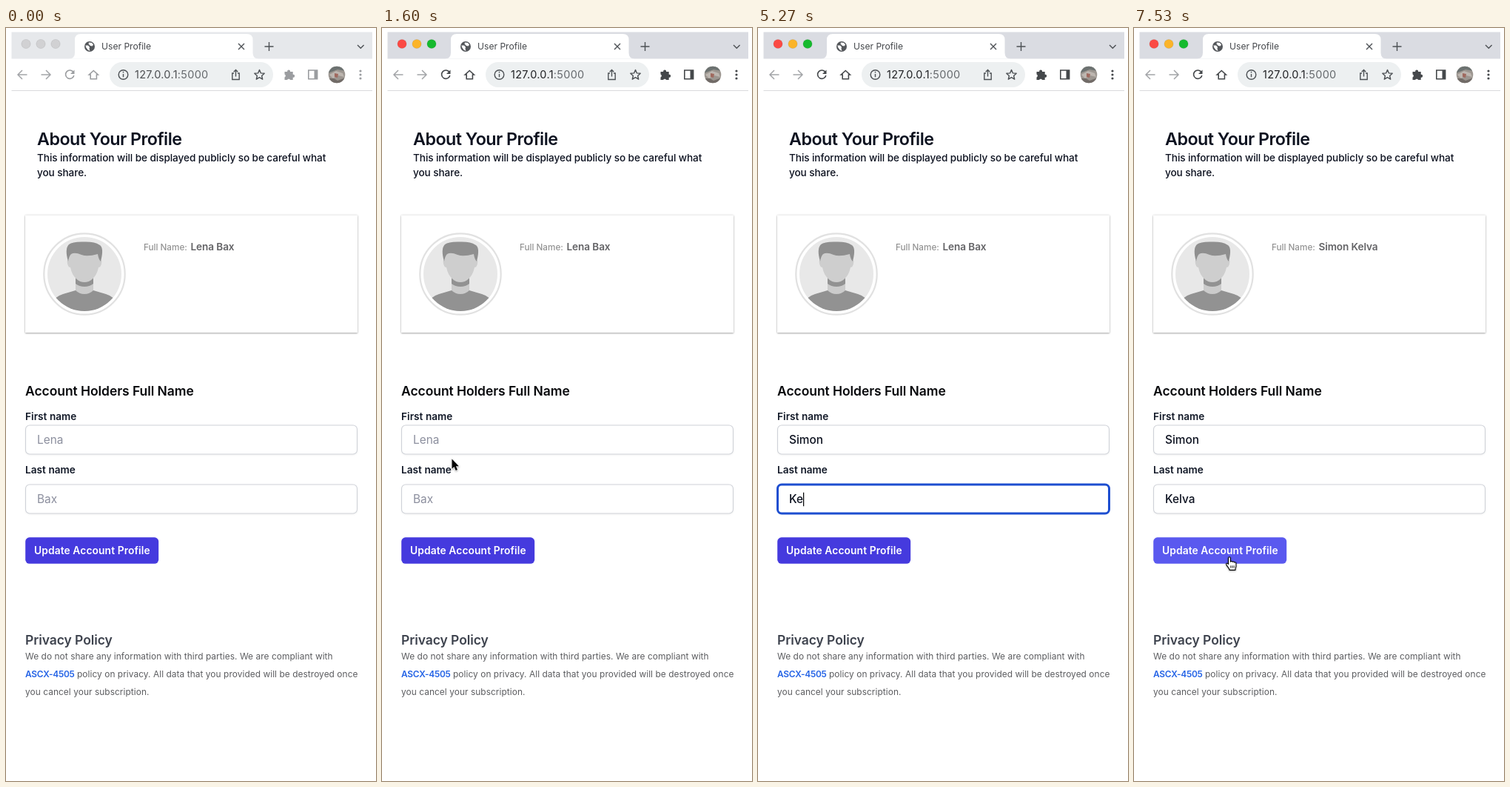
Write an HTML page that moves like this. It is 500 px wide and 1016 px high and loops after 8000 ms.

```html
<!DOCTYPE html>
<html lang="en">
<head>
<meta charset="utf-8">
<title>User Profile</title>
<style>
html, body { margin: 0; width: 100%; height: 100%; overflow: hidden; background: #fff; }
svg { display: block; width: 500px; height: 1016px; --strip: #dadce2; --icon: #45484b; --ink: #202124; }
svg.idle { --strip: #e6e8eb; --icon: #9b9da0; --ink: #4d4f52; }
text { font-family: Inter, "Open Sans", sans-serif; font-optical-sizing: none; white-space: pre; }
.line { fill: none; stroke: var(--icon); stroke-width: 1.6; }
.solid { fill: var(--icon); }
.fixed { fill: none; stroke: #4d5155; stroke-width: 1.4; }
.light { stroke: #0002; stroke-width: .6; }
.idle .light { fill: #d1d1d3; }
.title { font-size: 23.3px; font-weight: 600; letter-spacing: -.53px; fill: #0d1220; }
.head { font-size: 17.5px; font-weight: 600; letter-spacing: -.07px; }
.intro { font-size: 13.6px; font-weight: 500; letter-spacing: -.08px; fill: #0d1220; }
.label { font-size: 13.6px; font-weight: 600; letter-spacing: .04px; fill: #111827; }
.value { font-size: 15.4px; font-weight: 500; fill: #0d1220; }
.value.hint { font-weight: 400; fill: #8c8f9e; }
.small { font-size: 11.9px; letter-spacing: .06px; fill: #5c5d60; }
.link { font-weight: 600; letter-spacing: -.25px; fill: #2463e6; }
.box { fill: #fff; stroke: #cfd2d8; stroke-width: 1.1; filter: drop-shadow(0 1px 1px #0000000d); }
.box.focus { stroke: #1d4ed0; stroke-width: 3; filter: none; }
.button { fill: #453ade; }
.button.hover { fill: #5a59ef; }
.card { fill: #fff; filter: drop-shadow(0 1px 1px #0000004d) drop-shadow(0 0 1px #00000024); }
#pointer { filter: drop-shadow(0 1px 1px #0005); }
</style>
</head>
<body>
<svg id="stage" viewBox="0 0 500 1016">
  <defs>
    <clipPath id="disc"><circle cx="106" cy="332" r="50"/></clipPath>
    <clipPath id="badge"><circle cx="447" cy="63" r="11.3"/></clipPath>
  </defs>

  <!-- tab strip -->
  <path d="M7.5 5.5H495V41.5H7.5Z" style="fill:var(--strip)"/>
  <path d="M85 41.5q8 0 8-8V16q0-8 8-8H325.5q8 0 8 8V33.5q0 8 8 8Z" fill="#fff"/>
  <circle class="light" cx="27" cy="21.5" r="6.1" fill="#fb4a44"/>
  <circle class="light" cx="47" cy="21.5" r="6.1" fill="#fbb429"/>
  <circle class="light" cx="67" cy="21.5" r="6.1" fill="#16ba2e"/>
  <circle cx="113" cy="25" r="7" fill="#54575b"/>
  <path d="M107.5 23.5h3.5l2 2.2-.5 2.3 1 3-3-1.5-2.5-3.5ZM112 19.5l4 .5 2 2.5-1.5 2-2.5-.5-2.5-2.5Z" fill="#fff"/>
  <text x="129" y="29.3" font-size="12.1" fill="#45484c">User Profile</text>
  <path d="M314 21l8 8m0-8l-8 8" class="fixed"/>
  <path d="M349.5 25h12m-6-6v12" class="fixed"/>
  <path d="M475 23l4.3 4.3 4.3-4.3" class="fixed"/>

  <!-- toolbar -->
  <path d="M7.5 84.5H495" stroke="#d9dadc"/>
  <g fill="none" stroke="#a3a5a8" stroke-width="1.5">
    <path d="M28.5 63H16m6-6l-6 6 6 6"/>
    <path d="M47.5 63H60m-6-6l6 6-6 6"/>
  </g>
  <path class="line" d="M91 59.5a5.7 5.7 0 1 0 .8 4.5"/>
  <path class="solid" d="M92.5 56.5v5.5H87Z"/>
  <path class="line" d="M118.3 57.5l6 5.5h-1.9v5.8h-8.2V63h-1.9Z"/>
  <rect x="140" y="46" width="221" height="34" rx="17" fill="#edf0f1"/>
  <circle class="fixed" cx="158.5" cy="63" r="6.3"/>
  <path class="fixed" d="M158.5 62v4.2m0-7.4v1.6"/>
  <text x="174" y="68" font-size="14.5" letter-spacing=".3" style="fill:var(--ink)">127.0.0.1<tspan fill="#666a6e">:5000</tspan></text>
  <path class="fixed" d="M308 61h-2.2v8.5h9.4V61H313m-2.5 4.5v-9m-2.8 2.7l2.8-2.8 2.8 2.8"/>
  <path class="fixed" stroke-linejoin="round" d="M342.5 56.5l1.9 4.4 4.8.4-3.6 3.2 1.1 4.7-4.2-2.5-4.2 2.5 1.1-4.7-3.6-3.2 4.8-.4Z"/>
  <path class="solid" d="M376.5 59h3.7a2 2 0 1 1 3.8 0h3.7v3.8a2 2 0 1 1 0 3.9V70h-3.7a2.100 2.100 0 0 0-3.9 0h-3.6v-3.5a2.100 2.100 0 0 0 0-3.9Z"/>
  <path class="line" d="M408.8 57h11.8v11.8h-11.8Z"/>
  <path class="solid" d="M416.5 57h4v12h-4Z"/>
  <g clip-path="url(#badge)">
    <path d="M435 51h24v24h-24Z" fill="#9c9690"/>
    <path d="M435 51h24v7l-11-2-13 5Z" fill="#6c7271"/>
    <path d="M437 63l9-5 9 3 2 5-8-2-7 4Z" fill="#bdb6b0"/>
    <path d="M435 68l8 0 5 3 11-4v9h-24Z" fill="#716b67"/>
    <path d="M444 61l5 1-1 5-4-1Z" fill="#a0695e"/>
  </g>
  <g class="solid"><circle cx="479" cy="58" r="1.6"/><circle cx="479" cy="63" r="1.6"/><circle cx="479" cy="68" r="1.6"/></g>

  <!-- profile -->
  <text class="title" x="42" y="158">About Your Profile</text>
  <text class="intro" x="42" y="180">This information will be displayed publicly so be careful what</text>
  <text class="intro" x="42" y="200">you share.</text>
  <rect class="card" x="26" y="252.5" width="449" height="158.5"/>
  <circle cx="106" cy="332" r="54.7" fill="#fff" stroke="#e1e1e1" stroke-width="2.2"/>
  <g clip-path="url(#disc)">
    <path d="M56 282h100v100H56Z" fill="#e8e8e8"/>
    <path d="M64 371q2-9 13-12l17-5h24l17 5q11 3 13 12v14H64Z" fill="#929292"/>
    <path d="M94 335h24v19q-5 5-12 5t-12-5Z" fill="#cbcbcb"/>
    <path d="M94 335h24v10q-5 4-12 4t-12-4Z" fill="#929292"/>
    <path d="M84 313q-2 0-1 5t4 5q2 10 8 15.500 5 4.500 11 4.500t11-4.500q6-5.500 8-15.500 3 0 4-5t-1-5L126 299H87Z" fill="#cecece"/>
    <path d="M84 315q-5-17 1-23 5-4 20-3.500 15-.5 21 4 7 3 2 22.500-3-3-4-10-14 4-22 1-9-4-14-1-3 3-4 10Z" fill="#8f8f8f"/>
  </g>
  <text x="186" y="299.5" font-size="11.7" font-weight="500" fill="#929292">Full Name:</text>
  <text id="owner" x="249.5" y="300" font-size="13.6" font-weight="600" letter-spacing="-.1" fill="#636366"></text>

  <!-- form -->
  <text class="head" x="26" y="496" fill="#08090c">Account Holders Full Name</text>
  <text class="label" x="26" y="528.5">First name</text>
  <rect class="box" x="26.5" y="536" width="448" height="39" rx="5.5"/>
  <text class="value" x="42" y="561.3"></text>
  <text class="label" x="26" y="600.5">Last name</text>
  <rect class="box" x="26.5" y="616" width="448" height="39" rx="5.5"/>
  <text class="value" x="42" y="641.3"></text>
  <path id="caret" d="M.6-14.500V4" stroke="#000" stroke-width="1.2"/>
  <rect class="button" id="button" x="26.2" y="687.3" width="180" height="35.5" rx="5.5"/>
  <text x="38" y="710.3" font-size="13.8" font-weight="600" letter-spacing=".1" fill="#fff">Update Account Profile</text>

  <!-- policy -->
  <text class="head" x="26" y="831.5" fill="#3e434e">Privacy Policy</text>
  <text class="small" x="26" y="851.5">We do not share any information with third parties. We are compliant with</text>
  <text class="small" x="26" y="875.5"><tspan class="link">ASCX-4505</tspan> policy on privacy. All data that you provided will be destroyed once</text>
  <text class="small" x="26" y="899.5">you cancel your subscription.</text>

  <g id="pointer">
    <path id="arrow" d="M0 0V13.200L3 10.500 5.200 15.500 7.500 14.500 5.400 9.700H9.400Z" stroke="#fff" stroke-width="1.2" paint-order="stroke"/>
    <g id="beam" fill="none">
      <path d="M-3.500-7.500q3.500 0 3.500 2.500V5q0 2.500-3.500 2.500M3.500-7.500Q0-7.500 0-5V5q0 2.500 3.500 2.500M-2 1.500H2" stroke="#fff" stroke-width="2.6"/>
      <path d="M-3.500-7.500q3.500 0 3.500 2.500V5q0 2.500-3.500 2.500M3.500-7.500Q0-7.500 0-5V5q0 2.500 3.500 2.500M-2 1.500H2" stroke="#000" stroke-width="1.2"/>
    </g>
    <g id="hand" transform="translate(2.900 8.600) scale(1.1)" stroke="#000" stroke-linejoin="round">
      <path d="M-4-6.500c0-2 2.600-2 2.600 0v4.300c.6-1 2.200-.8 2.400.3.700-.8 2.100-.5 2.300.6.800-.7 2.200-.2 2.200 1.200V3c0 1.500-1 2.500-1 5H-2.500c0-2-2.800-4-4-6.800-.6-1.500 1-2.300 2.500-.4Z" fill="#fff"/>
      <path d="M-1 2.500v3M1 2.500v3M3 2.500v3" stroke-width=".8"/>
    </g>
  </g>
</svg>
<script>
const LOOP = 8000, TICK = 1000 / 15;
const $ = id => document.getElementById(id);
const stage = $('stage'), caret = $('caret'), pointer = $('pointer');
const boxes = document.querySelectorAll('.box');
const values = document.querySelectorAll('.value');

const fields = [
  { hint: 'Lena', text: 'Simon', keys: [3000, 3270, 3400, 3530, 3730] },
  { hint: 'Bax', text: 'Kelva', keys: [4800, 5270, 5530, 5670, 5870] }
];
const caretOff = [[2530, 3000], [4670, 4800], [6330, 6870]];

// time, x, y, and whether the move towards this point slows down
const path = [
  [0, 300, 985], [600, 215, 782, true], [1200, 215, 782], [1333, 191.5, 737],
  [1800, 73, 547, true], [6533, 75, 551], [6800, 102, 643], [7133, 129, 714, true]
];

const within = (t, [from, to]) => t >= from && t < to;
const show = (el, on) => el.setAttribute('visibility', on ? 'inherit' : 'hidden');

function pointerAt(t) {
  const time = Math.floor((t + 4) / TICK) * TICK + 1;
  const i = path.findIndex(p => p[0] > time);
  if (i < 0) return path[path.length - 1].slice(1, 3);
  const [a, b] = [path[i - 1], path[i]];
  let u = (time - a[0]) / (b[0] - a[0]);
  if (b[3]) u *= 2 - u;
  return [a[1] + (b[1] - a[1]) * u, a[2] + (b[2] - a[2]) * u];
}

function drawPointer(t) {
  const [x, y] = pointerAt(t);
  const inField = x > 26 && x < 475 && (y > 535 && y < 576 || y > 615 && y < 656);
  const onButton = x > 26 && x < 206 && y > 687 && y < 723;
  const visible = within(t, [70, 3000]) || t >= 6600;
  const kind = inField ? 'beam' : onButton ? 'hand' : 'arrow';
  for (const id of ['arrow', 'beam', 'hand']) show($(id), id === kind);
  show(pointer, visible);
  pointer.setAttribute('transform', `translate(${x.toFixed(1)} ${y.toFixed(1)})`);
  $('button').classList.toggle('hover', visible && onButton);
}

function drawForm(t) {
  const focus = within(t, [2000, 4130]) ? 0 : within(t, [4130, 7330]) ? 1 : -1;
  fields.forEach((f, i) => {
    const typed = f.text.slice(0, f.keys.filter(k => t >= k).length);
    values[i].textContent = typed || f.hint;
    values[i].classList.toggle('hint', !typed);
    boxes[i].classList.toggle('focus', i === focus);
    if (i === focus) {
      const x = 42 + (typed ? values[i].getComputedTextLength() : 0);
      caret.setAttribute('transform', `translate(${x} ${561.3 + 80 * i})`);
    }
  });
  show(caret, focus >= 0 && !caretOff.some(span => within(t, span)));
  const part = t < 7470 ? 'hint' : 'text';
  $('owner').textContent = fields.map(f => f[part]).join(' ');
}

function draw(t) {
  stage.classList.toggle('idle', t < 670);
  drawForm(t);
  drawPointer(t);
}

const start = performance.now();
function frame() {
  draw((performance.now() - start) % LOOP);
  requestAnimationFrame(frame);
}
frame();
</script>
</body>
</html>
```
